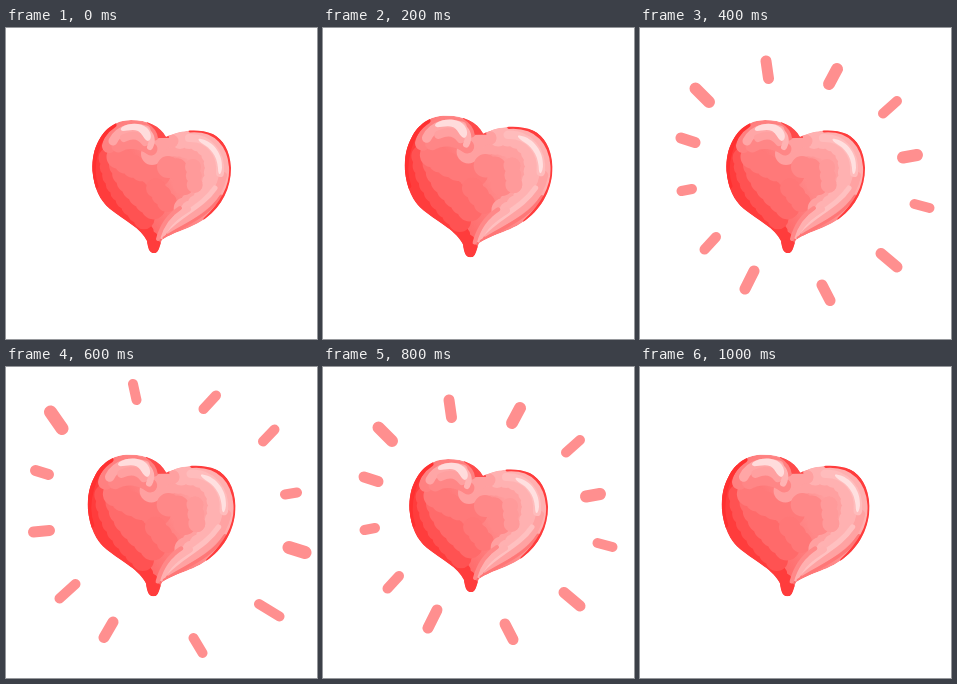
An HTML page that plays this animation: 311x311 px, repeating every 1200 ms.

```html
<!DOCTYPE html>
<html lang="en">
<head>
<meta charset="utf-8">
<title>Beating heart</title>
<style>
  html, body { margin: 0; width: 100%; height: 100%; overflow: hidden; background: #fff; }
  svg { display: block; width: 100%; height: 100%; }
  .line { fill: none; stroke-linecap: round; stroke-linejoin: round; }
  .daub { stroke-dasharray: 0 9; }
  .rays { stroke: #ff8f8f; visibility: hidden; }
</style>
</head>
<body>
<svg viewBox="0 0 311 311">
  <defs>
    <path id="outline" d="M160 109C154 98 142 92 125 92C109 92 99 101 93 112C88 121 86 131 86.500 143C88 160 94 173 104 181C119 193 135 200 141 213C142 220 143 225 148 225C153 225 153 219 156 212C164 205 186 201 200 190C216 178 225 160 225 140C224 122 217 111 207 106C192 100 174 102 160 109Z"/>
    <clipPath id="inside"><use href="#outline"/></clipPath>
    <linearGradient id="skin" gradientUnits="userSpaceOnUse" x1="96" y1="174" x2="196" y2="118">
      <stop offset="0" stop-color="#ff5555"/>
      <stop offset=".35" stop-color="#ff7272"/>
      <stop offset=".7" stop-color="#ff8e8e"/>
      <stop offset="1" stop-color="#ffb0b0"/>
    </linearGradient>
  </defs>

  <g id="heart" clip-path="url(#inside)">
    <use href="#outline" fill="url(#skin)"/>

    <!-- shaded left side and tip -->
    <g class="line daub">
      <path d="M93 106C82 136 96 164 112 180S143 202 148 222" stroke="#ff3c3c" stroke-width="18"/>
      <path d="M103 130C105 158 122 174 142 195" stroke="#ff5252" stroke-width="21"/>
      <path d="M115 137C120 156 136 168 149 181" stroke="#ff6a6a" stroke-width="24"/>
      <path d="M112 129C124 138 139 144 154 147" stroke="#ff7979" stroke-width="23"/>
      <path d="M150 160L164 178" stroke="#ff7777" stroke-width="20"/>
    </g>

    <!-- lighter right lobe -->
    <g class="line daub">
      <path d="M146 126C162 114 180 116 194 126S205 162 178 181" stroke="#ffa0a0" stroke-width="22"/>
      <path d="M162 139C176 140 183 151 174 164" stroke="#ff8888" stroke-width="22"/>
      <path d="M174 112C194 110 208 122 207 142S194 176 172 190" stroke="#ffb1b1" stroke-width="18"/>
      <path d="M187 139L189 160" stroke="#ff9a9a" stroke-width="16"/>
      <path d="M149 119L169 112" stroke="#ffa0a0" stroke-width="13"/>
    </g>
    <g class="line">
      <path d="M217 148C212 174 188 186 163 202" stroke="#ffa2a2" stroke-width="8"/>
      <path d="M209 160C196 179 176 185 159 203" stroke="#ffc0c0" stroke-width="5"/>
      <path d="M182 181C171 188 161 195 156 208" stroke="#ffb0b0" stroke-width="6"/>
      <path d="M174 180C163 187 156 196 152 211" stroke="#ff8888" stroke-width="4"/>
      <path d="M215 168C201 190 176 197 158 210" stroke="#ff7777" stroke-width="3"/>
    </g>

    <!-- left lobe -->
    <g class="line">
      <path d="M103 118C107 101 129 95 147 106" stroke="#ff8080" stroke-width="14"/>
      <path d="M112 118C121 112 135 114 145 121" stroke="#ff8686" stroke-width="13"/>
      <path d="M107 113C113 101 126 98 140 102" stroke="#ffa6a6" stroke-width="9"/>
      <path d="M118 110C126 106 134 107 139 114" stroke="#ffa0a0" stroke-width="8"/>
      <path d="M140 102C146 107 147 113 144 119" stroke="#ffb3b3" stroke-width="6"/>
    </g>
    <path fill="#ffdcdc" d="M116 99C124 94 136 95 141 100C146 105 146 112 142 113C138 112 137 106 132 103C127 101 121 103 117 103Q113 102 116 99Z"/>

    <!-- shine on the right lobe -->
    <path class="line" d="M183 110C202 109 216 125 214 145" stroke="#ffbcbc" stroke-width="8"/>
    <path fill="#ffe0e0" d="M195 111C207 113 217 126 216 140C215 148 212 148 212 140C211 127 204 120 197 116C192 113 191 110 195 111Z"/>

    <!-- rims -->
    <path d="M141 92L161 96L163 110L152 110Q151 101 141 95Z" fill="#ff4a4a"/>
    <g class="line">
      <path d="M184 103C211 101 223 119 224.500 139S215 176 199 191" stroke="#ff3c3c" stroke-width="3"/>
      <path d="M108 97C90 108 83 140 90 158" stroke="#ff3030" stroke-width="5"/>
      <path d="M145 215L148 222" stroke="#ff3c3c" stroke-width="7"/>
    </g>
  </g>

  <g class="line rays" id="near">
    <path stroke-width="11" d="M126 33L128.500 50.500M241 225.500L257 239M182 257L190 272.500M114 243L105 261M41 110L55 114.500"/>
    <path stroke-width="12" d="M197 41L189 56M277 127L263 129.500M55.500 60.500L69 74"/>
    <path stroke-width="10" d="M257 73L243 85.500M289.500 180L274.500 176M76 209L64.500 221.500M41.500 163L52 161"/>
  </g>
  <g class="line rays" id="far">
    <path stroke-width="10" d="M127 17L130.500 33M210 28.500L197.500 42M268.500 62.500L257 74.500M291 125.500L279 127.500M253 237L273.500 249.500M187.500 271L196.500 286M69.500 217L53.500 231.500"/>
    <path stroke-width="11" d="M107 255L98 270.500M27.500 165L43.500 163.500M29.500 103.500L42.500 107.500"/>
    <path stroke-width="13" d="M44.500 45L56 61.500M283 180.500L299 185.500"/>
  </g>
</svg>
<script>
  const STEP = 200, STEPS = 6;
  const heart = document.getElementById("heart");
  const near = document.getElementById("near");
  const far = document.getElementById("far");
  const start = performance.now();

  const show = (el, on) => { el.style.visibility = on ? "visible" : "hidden"; };

  function draw(now) {
    const step = Math.floor(Math.max(0, now - start) / STEP) % STEPS;
    const scale = step % 2 ? 1.066 : 1;
    heart.setAttribute("transform", `translate(156 159) scale(${scale}) translate(-156 -159)`);
    show(near, step === 2 || step === 4);
    show(far, step === 3);
    requestAnimationFrame(draw);
  }
  draw(start);
</script>
</body>
</html>
```
